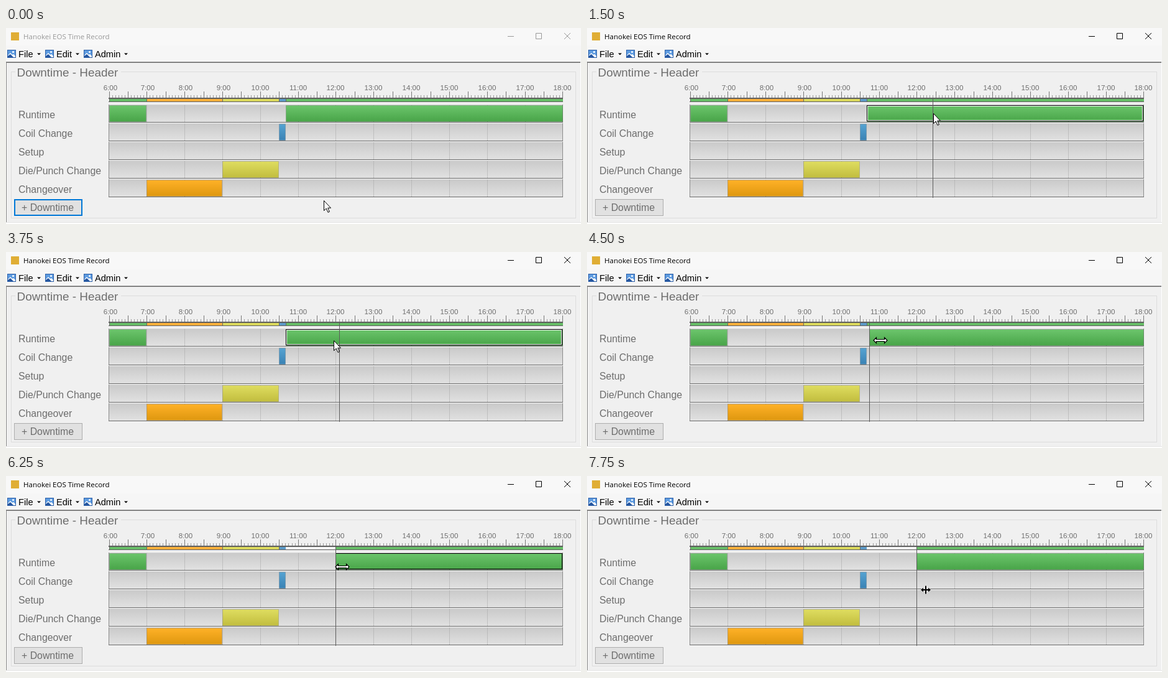
Write an HTML page that moves like this. It is 925 px wide and 315 px high and loops after 8000 ms.

```html
<!DOCTYPE html>
<html lang="en">
<head>
<meta charset="utf-8">
<title>Time Record</title>
<style>
html, body { margin: 0; width: 100%; height: 100%; overflow: hidden; background: #f0f0f0; }
svg { display: block; width: 100%; height: 100%; }
text { font-family: "Liberation Sans", Arial, sans-serif; white-space: pre; }
.title { font: 11.5px "Open Sans", "Noto Sans", sans-serif; }
.menu { font-size: 14.6px; fill: #000; }
.label { font-size: 15.85px; fill: #6d6d6d; }
.heading { font-size: 18.9px; fill: #6d6d6d; }
.hour { font-size: 11.6px; fill: #6d6d6d; text-anchor: middle; }
</style>
</head>
<body>
<svg id="stage" viewBox="0 0 925 315"></svg>
<script>
const stage = document.getElementById('stage');
const LOOP = 8000, STEP = 250;
const FIRST = 6, LAST = 18, LEFT = 165.5, HOUR = 60.83;
const hourX = h => Math.round(LEFT + (h - FIRST) * HOUR);
const snap = x => Math.round(LEFT + Math.round((x - LEFT) / HOUR * 12) * HOUR / 12);
const rowY = i => 123 + 30 * i;

function add(tag, attrs, parent = stage) {
  const el = document.createElementNS(stage.namespaceURI, tag);
  for (const key in attrs) el.setAttribute(key, attrs[key]);
  return parent.appendChild(el);
}
const rect = (x, y, width, height, fill) => add('rect', { x, y, width, height, fill });
const frame = (x, y, w, h, stroke, line = 1) => add('rect', {
  x: x + line / 2, y: y + line / 2, width: w - line, height: h - line,
  fill: 'none', stroke, 'stroke-width': line
});
const path = (d, attrs, parent) => add('path', { d, fill: 'none', ...attrs }, parent);
function label(x, y, cls, content) {
  const el = add('text', { x, y, class: cls });
  el.textContent = content;
  return el;
}
function gradient(id, top, bottom) {
  const el = add('linearGradient', { id, x2: 0, y2: 1 });
  add('stop', { 'stop-color': top }, el);
  add('stop', { offset: 1, 'stop-color': bottom }, el);
}
const show = (el, on) => { el.style.display = on ? '' : 'none'; };

function drawMenu() {
  let x = 2;
  for (const name of ['File', 'Edit', 'Admin']) {
    rect(x, 35, 14, 13, '#2c5fa8');
    rect(x + 1, 36, 12, 11, '#5d9be0');
    path(`M${x + 1} 44l4-4 3 3 2-1 3 3v2h-12z`, { fill: '#fff' });
    path(`M${x + 1} 47v-2l4-3 5 5z`, { fill: '#2456a0' });
    add('circle', { cx: x + 9.5, cy: 38.5, r: 1.5, fill: '#fff' });
    const width = label(x + 18, 47, 'menu', name).getComputedTextLength();
    const arrow = Math.round(x + 24 + width);
    path(`M${arrow} 40.5h6l-3 3z`, { fill: '#000' });
    x = arrow + 13;
  }
}

function drawWindow() {
  rect(0, 0, 925, 315, '#f0f0f0');
  rect(0, 0, 925, 28, '#f8f8f8');
  rect(0, 28, 925, 26, '#f6f6f6');
  rect(0, 54, 925, 1, '#a0a0a0');
  rect(0, 55, 924, 1, '#696969');
  rect(0, 55, 1, 258, '#8a8a8a');
  rect(924, 54, 1, 259, '#fff');
  rect(0, 312, 925, 1, '#e3e3e3');
  rect(0, 313, 925, 2, '#fff');
  rect(8, 7, 13, 13, '#e0ae35');
  drawMenu();
  frame(8, 70, 909, 236, '#dcdcdc');
  rect(15, 66, 170, 12, '#f0f0f0');
  label(17.5, 78, 'heading', 'Downtime - Header');
}

function drawAxis() {
  for (let i = 0; i <= (LAST - FIRST) * 12; i++) {
    const x = hourX(FIRST + i / 12), major = i % 6 === 0;
    rect(x, major ? 102 : 108, 1, major ? 10 : 4, major ? '#777' : '#999');
  }
  for (let h = FIRST; h <= LAST; h++)
    label(hourX(h) + (h < 10 ? 2 : 0), 100, 'hour', h + ':00');
  rect(165, 112, 731, 7, '#5f5f5f');
  rect(165, 114, 731, 4, '#f4f4f4');
}

function drawRow(name, i) {
  const y = rowY(i);
  label(20, y + 22, 'label', name);
  rect(165, y, 731, 28, 'url(#track)');
  for (let h = FIRST + 1; h < LAST; h++)
    path(`M${hourX(h) + .5} ${y + 1}v27`, { stroke: '#a4a4a4', 'stroke-dasharray': '1 1' });
  rect(165, y, 731, 1, '#d6d6d6');
  rect(165, y, 1, 28, '#8c8c8c');
  rect(895, y, 1, 28, '#8c8c8c');
  rect(165, y + 28, 731, 1, '#6c6c6c');
}

function place(el, from, to, inset = 0) {
  el.setAttribute('x', from + inset);
  el.setAttribute('width', to - from - 2 * inset);
}
// Each span is a bar in its row and a segment of the summary strip.
function drawSpan(row, fromHour, toHour, color, flat) {
  const from = hourX(fromHour), to = hourX(toHour);
  const bar = add('rect', { y: rowY(row) + 1.5, height: 26, fill: `url(#${color})`, stroke: '#000', 'stroke-opacity': .14 });
  const strip = add('rect', { y: 114, height: 4, fill: flat });
  const mark = rect(from, 113, 1, 5, '#666');
  place(bar, from, to, .5);
  place(strip, from, to);
  return { bar, strip, mark, from, to };
}

gradient('track', '#c9c9c9', '#e1e1e1');
gradient('green', '#6cc56c', '#48a448');
gradient('blue', '#55a3d2', '#3a82b4');
gradient('yellow', '#dfdd60', '#c1bd3e');
gradient('orange', '#ffb127', '#de970f');

drawWindow();
const caption = label(28, 18, 'title', 'Hanokei EOS Time Record');
const controls = path('M807 13.5h10M852.5 8.5h9v9h-9zM898 8l10 10M908 8l-10 10');
drawAxis();
['Runtime', 'Coil Change', 'Setup', 'Die/Punch Change', 'Changeover'].forEach(drawRow);
drawSpan(0, 6, 7, 'green', '#66bd66');
drawSpan(4, 7, 9, 'orange', '#fcb03a');
drawSpan(3, 9, 10.5, 'yellow', '#dbd95c');
drawSpan(1, 10.5, 10.68, 'blue', '#5b9ac8');
const run = drawSpan(0, 10.68, LAST, 'green', '#66bd66');
const outline = add('rect', { y: 124.5, height: 25, fill: 'none', stroke: '#000' });
const inner = add('rect', { y: 125.5, height: 23, fill: 'none', stroke: '#fff' });
const guide = rect(0, 112, 1, 161, '#5c5c5c');

rect(13, 275, 110, 27, '#e1e1e1');
frame(13, 275, 110, 27, '#adadad');
const focusEdge = frame(13, 275, 110, 27, '#0078d7', 2);
label(25, 294, 'label', '+ Downtime');

const pointers = {
  arrow: path('M.5 .5V16.5L4.2 13 7 19.3 9.4 18.2 6.7 12.2H11.5Z', { fill: '#fff', stroke: '#000' }),
  resize: path('M-11 0L-6.5-4.5V-1.5H6.5V-4.5L11 0 6.5 4.5V1.5H-6.5V4.5Z', { fill: '#fff', stroke: '#000', 'stroke-width': 1.2 }),
  split: path('M-8 0L-4-3.5V-1H-1V-6.5H1V-1H4V-3.5L8 0 4 3.5V1H1V6.5H-1V1H-4V3.5Z',
    { fill: '#000', stroke: '#fff', 'paint-order': 'stroke' })
};

// Key points of the pointer: time, x, y
const route = [
  [0, 511, 277], [1000, 557, 137], [1500, 557, 137], [2500, 495, 141], [2750, 492, 141],
  [3000, 464, 141], [3500, 535, 142], [3750, 527, 142], [4250, 453, 142], [4750, 490, 142],
  [5000, 502, 142], [5250, 530, 143], [5500, 547, 146], [6000, 547, 146], [6250, 541, 146],
  [7000, 545, 183]
];
function pointerAt(t) {
  const next = route.findIndex(p => p[0] > t);
  if (next < 1) return (next ? route.at(-1) : route[0]).slice(1);
  const [t0, x0, y0] = route[next - 1], [t1, x1, y1] = route[next];
  const k = (t - t0) / (t1 - t0);
  return [x0 + (x1 - x0) * k, y0 + (y1 - y0) * k].map(Math.round);
}

const ACTIVATE = 1500, HOVER = 1000, GRAB = 4250, DRAG = 4500, DROP = 6250, LEAVE = 6750;
const noon = hourX(12);

function render(time) {
  const t = Math.floor(time / STEP) * STEP;
  const [x, y] = pointerAt(t);
  // The guide trails the pointer by one step, on a five-minute grid.
  const [trailX, trailY] = pointerAt(t - STEP);
  const guideX = t < DRAG ? snap(trailX) : Math.min(noon, Math.max(run.from, snap(trailX)));
  const barLeft = t < DRAG ? run.from : guideX;
  const stripLeft = t < DROP ? run.from : noon;
  const focused = t >= HOVER && t < DRAG;
  const ink = t < ACTIVATE ? '#999' : '#000';

  caption.setAttribute('fill', ink);
  controls.setAttribute('stroke', ink);
  show(focusEdge, t < HOVER);

  place(run.bar, barLeft, run.to + 1, .5);
  place(run.strip, stripLeft, run.to + 1);
  run.mark.setAttribute('x', stripLeft);
  place(outline, barLeft, run.to, .5);
  place(inner, barLeft, run.to, 1.5);
  show(outline, focused || (t >= DROP && t < LEAVE));
  show(inner, focused);

  guide.setAttribute('x', guideX);
  show(guide, trailY < rowY(5));

  const kind = t < GRAB ? 'arrow' : t < LEAVE ? 'resize' : 'split';
  for (const name in pointers) show(pointers[name], name === kind);
  pointers[kind].setAttribute('transform', `translate(${x} ${y})`);
}

const start = performance.now();
function tick() {
  render((performance.now() - start) % LOOP);
  requestAnimationFrame(tick);
}
tick();
</script>
</body>
</html>
```
